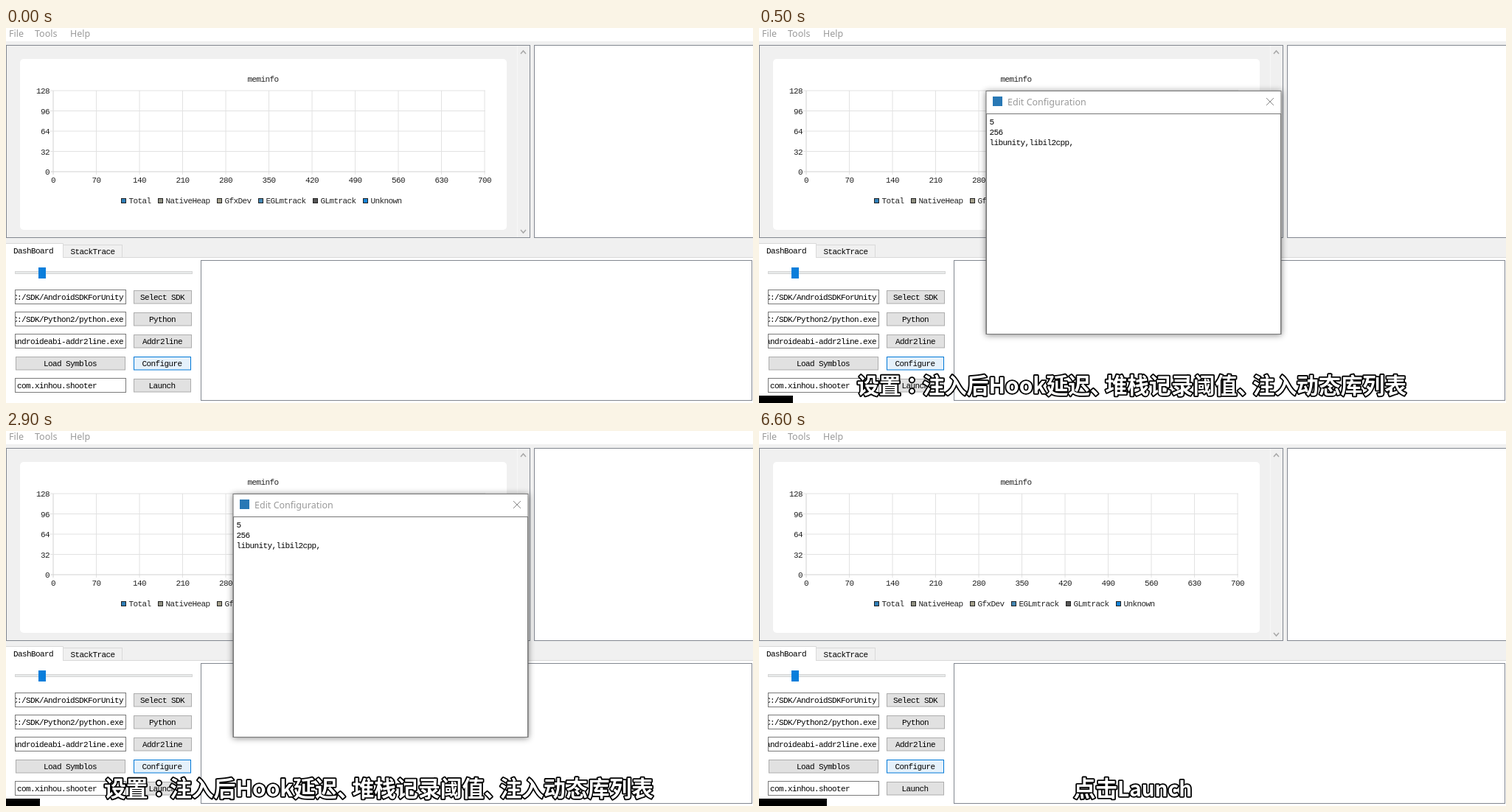
An HTML page that plays this animation: 1013x509 px, repeating every 8000 ms.

```html
<!DOCTYPE html>
<html lang="zh-CN">
<head>
<meta charset="utf-8">
<title>Memory profiler</title>
<style>
html, body { margin: 0; width: 100%; height: 100%; overflow: hidden; background: #fff; }
svg { display: block; width: 1013px; height: 509px; }
text { white-space: pre; }
.mono { font: 11px "Liberation Mono", monospace; letter-spacing: -.6px; }
.ui { font: 12.5px "Noto Sans", sans-serif; fill: #9a9a9a; }
.cap { font-family: "Noto Sans CJK SC", "Noto Sans CJK", sans-serif; font-weight: 700;
  fill: #fff; stroke: #000; stroke-width: 3.6px; stroke-linejoin: round; paint-order: stroke; }
.colon { font-family: "Noto Sans CJK JP", "Noto Sans CJK", sans-serif; }
.shadow { filter: drop-shadow(0 1px 4px #0007); }
</style>
</head>
<body>
<svg id="stage" viewBox="0 0 1013 509"></svg>
<script>
const LOOP = 8000, OPEN = 500, CLOSE = 4500;

const rect = (x, y, w, h, fill, stroke = 'none', rx = 0) =>
  `<rect x="${x}" y="${y}" width="${w}" height="${h}" fill="${fill}" stroke="${stroke}" rx="${rx}"/>`;
const path = (d, stroke, width = 1) =>
  `<path d="${d}" fill="none" stroke="${stroke}" stroke-width="${width}"/>`;
const text = (x, y, s, cls = 'mono', attrs = '') =>
  `<text x="${x}" y="${y}" class="${cls}" ${attrs}>${s}</text>`;
const centered = (cx, y, s, attrs) => text(cx - s.length * 3, y, s, 'mono', attrs);
const group = (id, body) => `<g id="${id}" visibility="hidden">${body}</g>`;

const GRAY = '#f0f0f0', EDGE = '#828790', INK = 'fill="#222"';

function panels() {
  return rect(0, 18, 1013, 294, GRAY)
    + rect(.5, 23.5, 710, 261, GRAY, EDGE)
    + path('M693.5 24V284', '#f7f7f7')
    + path('M698 35l3.5-4 3.5 4M698 274l3.5 4 3.5-4', '#a8a8a8', 1.5)
    + rect(716.5, 23.5, 300, 261, '#fff', EDGE)
    + ['File', 'Tools', 'Help'].map((s, i) => text([4, 39, 87][i], 12, s, 'ui')).join('');
}

function chart() {
  let out = rect(19, 42, 660, 232, '#fff', 'none', 5) + centered(348.5, 73, 'meminfo', INK);
  for (let i = 0; i <= 10; i++) {
    const x = 64 + i * 58.5;
    out += path(`M${x} 85V199`, i ? '#e2e2e2' : '#d2d2d2') + centered(x, 210, String(i * 70), INK);
  }
  for (let i = 0; i <= 4; i++) {
    const y = 195 - i * 27.5, label = String(i * 32);
    out += path(`M60 ${y}H650`, i ? '#e2e2e2' : '#d2d2d2')
      + text(59 - label.length * 6, y + 4, label, 'mono', INK);
  }
  const legend = { Total: '#2f7fb9', NativeHeap: '#929284', GfxDev: '#a5a18c',
    EGLmtrack: '#4588b5', GLmtrack: '#555', Unknown: '#1684d8' };
  let x = 156;
  for (const [name, color] of Object.entries(legend)) {
    out += rect(x + .5, 231.5, 6, 6, color, '#222') + text(x + 10.5, 238, name, 'mono', INK);
    x += name.length * 6 + 20;
  }
  return out;
}

function controls() {
  const button = (x, y, w, s, active) =>
    rect(x + .5, y + .5, w, 17.5, active ? '#e5f1fb' : '#e1e1e1', active ? '#0078d7' : '#adadad')
    + centered(x + w / 2, y + 13, s);
  const field = (y, x, s) => rect(12.5, y - .5, 150, 19, '#fff', '#7a7a7a')
    + text(x, y + 13, s, 'mono', 'clip-path="url(#fields)"');
  return '<clipPath id="fields"><rect x="13" y="350" width="149" height="150"/></clipPath>'
    + path('M0 311.5H1013', '#d9d9d9')
    + rect(77.5, 294.5, 80, 17, GRAY, '#d9d9d9')
    + rect(0, 292, 77, 20, '#fff') + path('M0 292.5H77.5V311', '#d9d9d9')
    + centered(37, 306, 'DashBoard') + centered(117.5, 307, 'StackTrace')
    + rect(12.5, 330.5, 240, 3, '#e7eaea', '#d6d6d6') + rect(44, 325, 10, 15, '#0a7edb')
    + field(356, 9, 'C:/SDK/AndroidSDKForUnity')
    + field(386, 9, 'C:/SDK/Python2/python.exe')
    + field(416, 9, 'androideabi-addr2line.exe')
    + field(476, 15, 'com.xinhou.shooter')
    + button(173, 356, 78, 'Select SDK') + button(173, 386, 78, 'Python')
    + button(173, 416, 78, 'Addr2line') + button(13, 446, 148, 'Load Symblos')
    + button(173, 446, 77, 'Configure', true) + button(173, 476, 77, 'Launch')
    + rect(264.5, 315.5, 747, 190, '#fff', EDGE);
}

function dialog() {
  return `<g class="shadow">${rect(308, 85.5, 400, 330, '#fff', '#777')}</g>`
    + rect(308.5, 116.5, 399, 299, '#fff', '#777')
    + rect(317, 93, 13, 13, '#2878b5')
    + text(337, 105, 'Edit Configuration', 'ui')
    + path('M688 95l10 10M698 95l-10 10', '#888')
    + ['5', '256', 'libunity,libil2cpp,'].map((s, i) => text(312.5, 131 + i * 14, s)).join('');
}

const caption = parts => parts.map(([x, s, size = 29.8, cls = '']) =>
  text(x, 496, s, 'cap ' + cls, `font-size="${size}"`)).join('');

const stage = document.getElementById('stage');
stage.innerHTML = panels() + chart() + controls()
  + group('config', dialog() + rect(0, 499, 46, 10, '#000') + caption([
    [133, '设置'], [192.5, '：', 29.8, 'colon'], [222, '注入后'], [311.5, 'Hook'], [389.5, '延迟、'],
    [469.5, '堆栈记录阈值、'], [669.5, '注入动态库列表']]))
  + group('launch', rect(0, 499, 92, 10, '#000') + caption([[426.5, '点击'], [486, 'Launch', 28]]));

const config = document.getElementById('config'), launch = document.getElementById('launch');
const show = (el, on) => el.setAttribute('visibility', on ? 'visible' : 'hidden');
const start = performance.now();

function draw(now) {
  const t = Math.max(0, now - start) % LOOP;
  show(config, t >= OPEN && t < CLOSE);
  show(launch, t >= CLOSE);
  requestAnimationFrame(draw);
}
draw(start);
</script>
</body>
</html>
```
